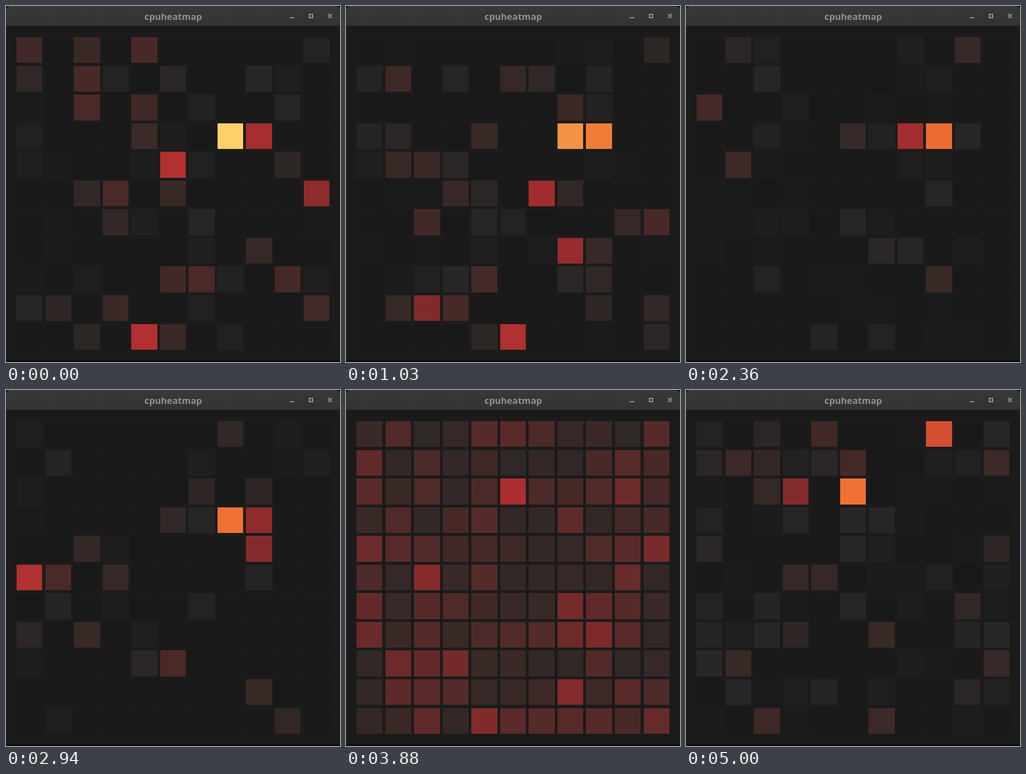
An HTML page for the animation above (5030 ms loop, 600 px wide and 640 px high).

```html
<!DOCTYPE html>
<html lang="en">
<head>
<meta charset="utf-8">
<title>cpuheatmap</title>
<style>
  html, body { margin: 0; width: 100%; height: 100%; overflow: hidden; background: #0e0e0e; }
  svg { display: block; }
  text { font: 700 16.4px "Noto Sans", "Open Sans", sans-serif; fill: #929190; }
</style>
</head>
<body>
<svg width="600" height="640" viewBox="0 0 600 640">
  <defs>
    <linearGradient id="bar" x2="0" y2="1">
      <stop stop-color="#393939"/>
      <stop offset="1" stop-color="#323232"/>
    </linearGradient>
  </defs>
  <path d="M0 37V8a8 8 0 0 1 8-8H592a8 8 0 0 1 8 8V37Z" fill="url(#bar)"/>
  <path d="M0 36H600V637H0Z" fill="#1b1b1b"/>
  <path d="M0 36H600V37H0Z" fill="#161616"/>
  <text x="300.5" y="25" text-anchor="middle">cpuheatmap</text>
  <path d="M510 21h8M545 15h6v6h-6ZM578.5 14.5l7 7M585.5 14.5l-7 7"
        fill="none" stroke="#929190" stroke-width="2"/>
  <g id="grid"></g>
</svg>
<script>
const SIDE = 11, CELLS = SIDE * SIDE, LOOP = 5030;

// Colour ramp, one stop for every two heat levels.
const ramp = ['191919', '262626', '3a2927', '5c2a2a', '802a2a',
  'a12c2f', 'c0362f', 'f07232', 'fdd168', 'fdff9c']
  .map(hex => [0, 2, 4].map(i => parseInt(hex.slice(i, i + 2), 16)));

let seed = 7;
function random() {
  seed = (seed * 1664525 + 1013904223) % 4294967296;
  return seed / 4294967296;
}

// Load at one moment: light random work on a share of the cells, plus the busiest ones.
function sample(time, share, busy, base = 0, spread = 5) {
  const heat = Array.from({length: CELLS}, () => {
    const active = random() < share, amount = random() ** 1.5;
    return base + (active ? spread * amount : 0);
  });
  return {time, heat: Object.assign(heat, busy)};
}

const samples = [
  sample(0, .45, {40: 16, 41: 10.3, 49: 11, 65: 9, 114: 11}),
  sample(515, .4, {40: 15, 41: 12}),
  sample(1030, .4, {40: 14.7, 41: 14.2, 61: 10, 84: 9.4, 101: 8, 115: 11}),
  sample(1380, .3, {41: 15.5, 40: 10}),
  sample(1730, .25, {41: 17, 33: 12, 60: 8, 117: 7}),
  sample(2335, .25, {41: 14, 40: 10}),
  sample(2940, .25, {40: 14, 41: 9, 52: 8.3, 55: 11}),
  sample(3210, .3, {40: 13}),
  sample(3490, 1, {40: 11.4}, 5, 6),
  sample(4270, .5, {27: 12.8, 57: 8.3, 73: 8, 85: 10, 89: 8, 114: 8}, 1),
  sample(4635, .5, {27: 13.3}),
  sample(5000, .6, {27: 14, 8: 12.8, 25: 8.2})
];

const grid = document.getElementById('grid');
const edge = n => 19 + 51.55 * n;
const cells = Array.from({length: CELLS}, (_, i) => {
  const rect = document.createElementNS('http://www.w3.org/2000/svg', 'rect');
  const place = (pos, size, n, offset) => {
    const start = Math.round(edge(n));
    rect.setAttribute(pos, start + offset);
    rect.setAttribute(size, Math.round(edge(n) + 46.45) - start);
  };
  place('x', 'width', i % SIDE, 0);
  place('y', 'height', Math.floor(i / SIDE), 37);
  return grid.appendChild(rect);
});

const mix = (a, b, t) => a + (b - a) * t;

function colour(heat) {
  const pos = heat / 2, low = Math.floor(pos);
  return `rgb(${ramp[low].map((c, i) => Math.round(mix(c, ramp[low + 1][i], pos - low)))})`;
}

function draw(time) {
  const last = samples.length - 1;
  const next = samples.findIndex(s => s.time > time);
  const b = samples[next < 0 ? last : next];
  const a = samples[next < 0 ? last - 1 : next - 1];
  const t = Math.min(1, (time - a.time) / (b.time - a.time));
  cells.forEach((cell, i) => cell.setAttribute('fill', colour(mix(a.heat[i], b.heat[i], t))));
}

function frame() {
  draw(performance.now() % LOOP);
  requestAnimationFrame(frame);
}
frame();
</script>
</body>
</html>
```
